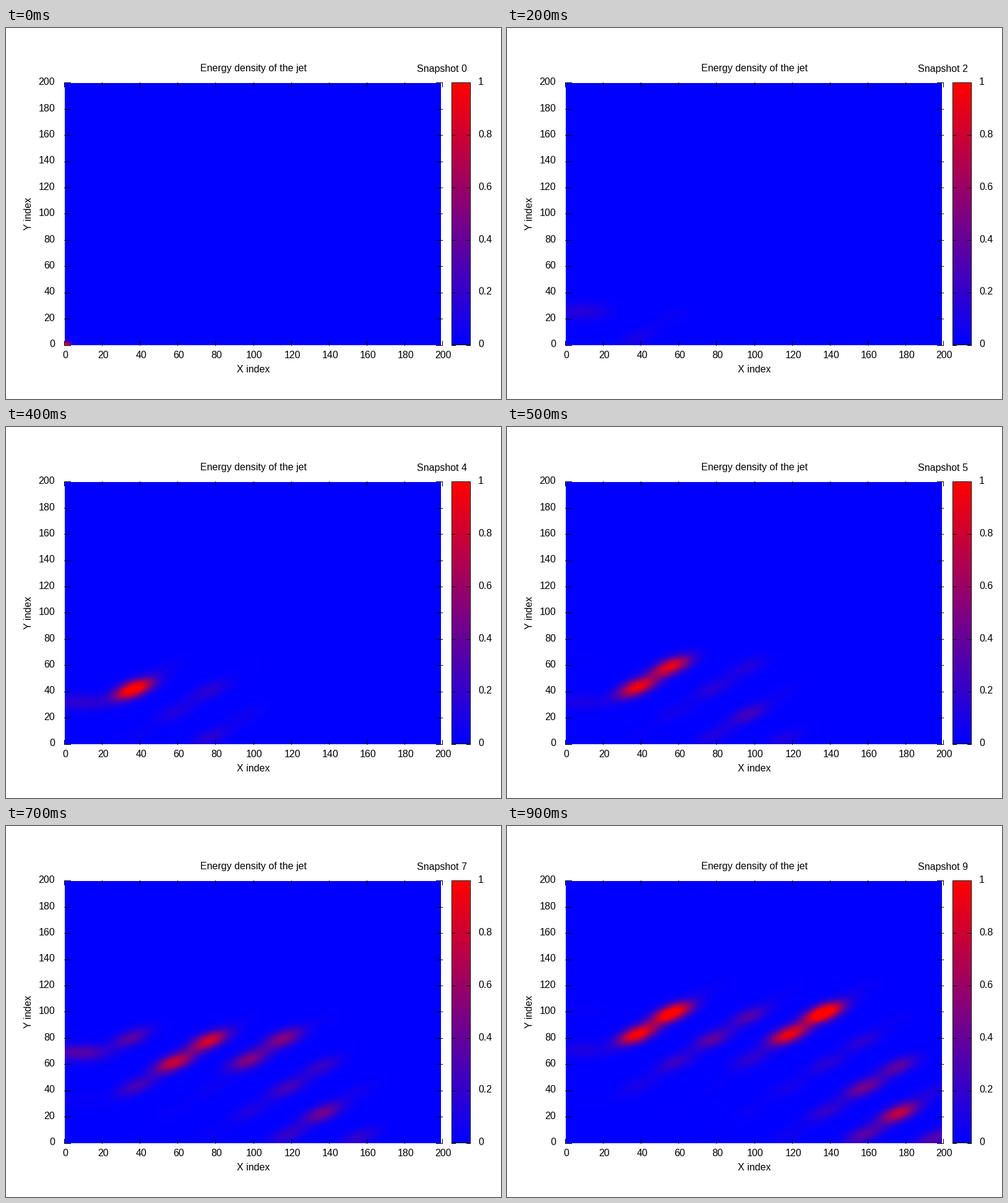
These frames come from a looping animation (800 px wide and 600 px high, 1 s). A matplotlib script:

```python
import numpy as np
import matplotlib.pyplot as plt
from matplotlib.animation import FuncAnimation
from matplotlib.colors import LinearSegmentedColormap
from matplotlib.patches import Rectangle

plt.rcParams["font.family"] = "Liberation Sans"
DPI = 100
FONT = 16 * 72 / DPI
KNOT_DX, KNOT_DY = 20, 18

cells_x, cells_y = np.meshgrid(np.arange(200) + 0.5, np.arange(200) + 0.5)


def bell(offset, spread):
    return np.exp(-0.5 * (offset / spread) ** 2)


def pulse(age):
    """Quick rise to full strength, then a slow decay."""
    return bell(age, 0.56) if age < 0 else 1 / (1 + (age / 1.9) ** 2.5)


def blob(x, y, width, height, tilt=0.0):
    u, v = (cells_x - x) / width, (cells_y - y) / height
    return np.exp(-(u * u + v * v - 2 * tilt * u * v) / (2 * (1 - tilt ** 2)))


def stream(step, x, y, start, delay, peak, crest, spread):
    """Knots on a rising diagonal that light up one after the other."""
    field = 0
    for i in range(6):
        age = step - start - delay * i
        drift = 1.5 * np.clip(age, -1.5, 1)
        field = field + peak * bell(i - crest, spread) * pulse(age) * blob(
            x + KNOT_DX * i + drift, y + KNOT_DY * i + drift, 7.2, 5.6, 0.6)
    return field


def density(step):
    field = 0.9 * np.exp(-4 * step) * blob(0.5, 0.5, 1.9, 1.9)
    # Three strong streams above.
    field += stream(step, 36.5, 42, 4, 1.45, 1.3, 0.7, 1.4)
    field += stream(step, 36.5, 81.5, 7.9, 1.2, 1.35, 0.4, 1.2)
    field += stream(step, 97, 63.5, 6.6, 1.2, 1.4, 1.5, 1.0)
    # Streams leaving the floor, each stronger than the one before.
    for j in range(5):
        field += stream(step, 37 + 40 * j, 5, 1.75 + 2 * j, 1.2,
                        0.18 * 1.7 ** j, 2, 1.8)
    # Level bands at the left wall.
    for j in range(3):
        age = step - 2.6 - 3.9 * j
        y = 28 + 39 * j + 4 * np.clip(age, -1, 1)
        for x in (2, 14):
            field += (0.19 + 0.06 * j) * pulse(age) * blob(x, y, 7.2, 4.5)
    return field


fig = plt.figure(figsize=(8, 6), dpi=DPI, facecolor="white")
ax = fig.add_axes([0, 0, 1, 1])
cmap = LinearSegmentedColormap.from_list("heat", ["#0000ff", "#ff0000"], N=256)


def show(data, extent):
    return ax.imshow(data, cmap=cmap, vmin=0, vmax=1, origin="lower",
                     extent=extent, aspect="auto", interpolation="nearest")


def bar(x, y, width, height):
    ax.add_patch(Rectangle((x, y), width, height, fc="black", lw=0,
                           antialiased=False))


def label(x, baseline, text, ha="center", **style):
    return ax.text(x, baseline, text, ha=ha, va="baseline", fontsize=FONT,
                   color="black", **style)


heat = show(density(0), (95, 703, 513, 89))
show(np.linspace(0, 1, 128)[:, None], (720, 751, 513, 88))
for y in (88, 512):
    bar(720, y, 31, 1)
for x in (720, 750):
    bar(x, 88, 1, 425)

for k in range(11):
    x, y = int(94.5 + 61.1 * k), int(513.2 - 42.45 * k)
    baseline = int(516.8 - 42.4 * k)
    size = 6 if k % 2 else 8
    bar(x, 88, 1, size)
    bar(x, 514 - size, 1, size)
    bar(94, y, 11, 1)
    bar(695, y, 11, 1)
    label(96 + 61.1 * k, 534, str(20 * k))
    label(79, baseline, str(20 * k), "right")
    if k % 2 == 0:
        bar(720, y, 7, 1)
        bar(744, y, 7, 1)
        label(763, baseline, f"{k / 10:g}", "left")

label(400.5, 70, "Energy density of the jet")
label(399.5, 557, "X index")
label(41, 300, "Y index", rotation=90, rotation_mode="anchor")
snapshot = label(745, 71, "Snapshot 0", "right")

ax.set_xlim(0, 800)
ax.set_ylim(600, 0)
ax.axis("off")


def update(step):
    heat.set_data(density(step))
    snapshot.set_text(f"Snapshot {step}")
    return heat, snapshot


animation = FuncAnimation(fig, update, frames=10, interval=100, repeat=True,
                          repeat_delay=0, blit=False)
plt.show()
```
